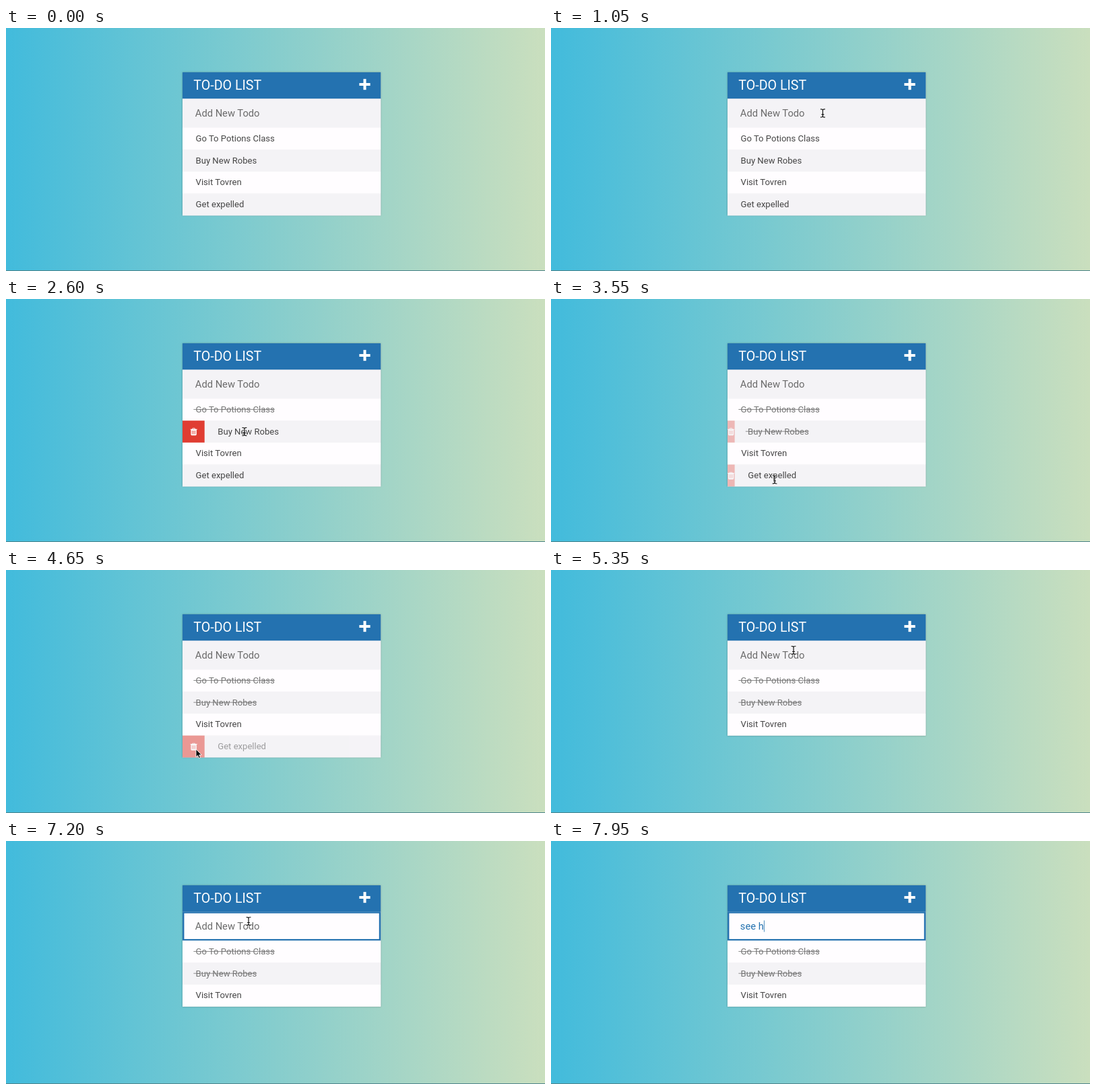
These frames come from a looping animation (800x362 px, 8 s). An HTML page:

```html
<!DOCTYPE html>
<html lang="en">
<head>
<meta charset="utf-8">
<title>To-do list</title>
<style>
  html, body { margin: 0; width: 100%; height: 100%; overflow: hidden; }
  body {
    position: relative;
    font: 16px Roboto, sans-serif;
    background: linear-gradient(to right, #42bbdc, #cadfbe);
  }
  .edge { position: absolute; left: 0; right: 0; top: 361px; height: 1px; background: #4f858c; }
  .card {
    position: absolute; left: 262px; top: 65.8px; width: 360px;
    transform: scale(.8172); transform-origin: 0 0;
    background: #f4f3f6; box-shadow: 0 0 3px rgba(0, 0, 0, .3);
  }
  h1 {
    position: relative; margin: 0; padding: 10px 20px;
    font-size: 24px; font-weight: 400; line-height: 28px;
    color: #fff; background: #2472b0;
  }
  h1 svg { position: absolute; left: 320.5px; top: 11.5px; }
  .field {
    box-sizing: border-box; height: 53px; padding: 13px 13px 13px 20px;
    border: 3px solid transparent; background: #f4f3f6;
    font-size: 18px; line-height: 21px; white-space: pre; color: #2472b0;
  }
  .field.focus { border-color: #2472b0; background: #fffdff; }
  .hint { color: #6b6b6b; }
  .caret {
    display: inline-block; width: 1.2px; height: 21px; margin-right: -1.2px;
    vertical-align: top; background: #2472b0;
  }
  ul { list-style: none; margin: 0; padding: 0; }
  li { position: relative; height: 40px; line-height: 40px; color: #454545; background: #fffdff; }
  li:nth-child(2n) { background: #f4f3f6; }
  li.done { color: #757575; }
  li.done .label { text-decoration: line-through; }
  .label { position: absolute; top: 0; white-space: pre; }
  .bin { position: absolute; left: 0; top: 0; height: 40px; background: #e03d32; }
  .bin svg { position: absolute; top: 12.5px; }
  .cursor { position: absolute; left: 0; top: 0; overflow: visible; }
</style>
</head>
<body>
<div class="edge"></div>
<div class="card">
  <h1>TO-DO LIST
    <svg width="20" height="20"><path d="M10 2.2V17.8M2.2 10H17.8" stroke="#fff" stroke-width="5" stroke-linecap="square"/></svg>
  </h1>
  <div class="field"><span class="typed"></span><span class="caret"></span><span class="hint">Add New Todo</span></div>
  <ul></ul>
</div>
<svg class="cursor" width="1" height="1">
  <g class="beam" fill="none" stroke-linecap="round">
    <path d="M-3 -6Q0 -6 0 -4.5Q0 -6 3 -6M0 -4.5V4.5M-3 6Q0 6 0 4.5Q0 6 3 6M-1.5 2H1.5" stroke="#fff" stroke-opacity=".6" stroke-width="2.4"/>
    <path d="M-3 -6Q0 -6 0 -4.5Q0 -6 3 -6M0 -4.5V4.5M-3 6Q0 6 0 4.5Q0 6 3 6M-1.5 2H1.5" stroke="#111" stroke-width="1.2"/>
  </g>
  <path class="arrow" d="M0 0V11.6L2.6 9.2L4.4 13.4L6.5 12.5L4.7 8.4H8.2Z" fill="#000" stroke="#fff" stroke-width=".9"/>
</svg>
<script>
const LOOP = 8000, SLIDE = 200, BLINK = 500;
const FOCUS = 5600, TYPE_FROM = 7480;

// hovers: [enter, leave] times of the pointer
const items = [
  { text: 'Go To Potions Class', done: 1900, hovers: [[1200, 2250], [5051, 5097]] },
  { text: 'Buy New Robes', done: 2850, hovers: [[2250, 3415], [5005, 5051]] },
  { text: 'Visit Tovren', hovers: [[3415, 3485], [4959, 5005]] },
  { text: 'Get expelled', fade: [4400, 4900], hovers: [[3485, 4930]] }
];

// pointer path: [time, x, y]
const path = [
  [950, 415, 112], [1350, 369, 171], [2150, 369, 171], [2400, 356, 197],
  [3370, 346, 200], [3415, 342, 213.9], [3485, 336, 246.6], [3550, 332, 269],
  [3750, 330, 267], [4100, 282, 267], [4930, 282, 267], [5130, 352, 125],
  [5300, 360, 119.5], [LOOP, 360, 119.5]
];
const arrowTimes = [4020, 4990];
const keys = [[7480, 's'], [7580, 'se'], [7680, 'see'], [7800, 'see '], [7900, 'see h']];

const $ = selector => document.querySelector(selector);
const clamp = v => Math.min(1, Math.max(0, v));
const within = (t, [from, to]) => t >= from && t < to;
const show = (el, on) => { el.style.display = on ? '' : 'none'; };

const trash = `<svg width="13" height="15"><path fill="#fff" fill-rule="evenodd"
  d="M0 2.2H3.4L4.2 .5H8.4L9.2 2.2H12.6V3.4H11.4V12.2Q11.4 14 9.8 14H2.8Q1.2 14 1.2 12.2V3.4H0Z
  M4.6 2.2H8L7.6 1.5H5Z M3.3 5V11.8H4.3V5Z M5.8 5V11.8H6.8V5Z M8.3 5V11.8H9.3V5Z"/></svg>`;

for (const item of items) {
  const li = document.createElement('li');
  li.innerHTML = `<span class="bin">${trash}</span><span class="label"> ${item.text}</span>`;
  $('ul').append(li);
  item.li = li;
  [item.bin, item.label] = li.children;
  item.icon = item.bin.firstChild;
}

const reveal = (t, hovers) => Math.max(...hovers.map(([enter, leave]) =>
  clamp(clamp((Math.min(t, leave) - enter) / SLIDE) - Math.max(0, t - leave) / SLIDE)));

function drawItem(item, t) {
  const open = reveal(t, item.hovers), width = 40 * open;
  item.bin.style.width = width + 'px';
  item.bin.style.opacity = open;
  item.icon.style.left = Math.max(0, (width - 12.6) / 2) + 'px';
  item.label.style.left = 20 + width + 'px';
  item.li.classList.toggle('done', t >= item.done);
  if (item.fade) {
    const [from, to] = item.fade;
    item.li.style.opacity = .5 + Math.cos(Math.PI * clamp((t - from) / (to - from))) / 2;
    show(item.li, t < to);
  }
}

function drawField(t) {
  const typed = keys.filter(([at]) => t >= at).map(([, text]) => text).pop() || '';
  const blinkOn = Math.floor((t - FOCUS) / BLINK) % 2 === 0;
  $('.field').classList.toggle('focus', t >= FOCUS);
  $('.typed').textContent = typed;
  show($('.hint'), !typed);
  show($('.caret'), t >= FOCUS && (typed || blinkOn));
}

function drawCursor(t) {
  const visible = within(t, [path[0][0], TYPE_FROM]);
  show($('.cursor'), visible);
  if (!visible) return;
  const next = path.findIndex(([at]) => at > t);
  const [t0, x0, y0] = path[next - 1], [t1, x1, y1] = path[next];
  const k = (t - t0) / (t1 - t0);
  $('.cursor').style.transform = `translate(${x0 + (x1 - x0) * k}px, ${y0 + (y1 - y0) * k}px)`;
  const arrow = within(t, arrowTimes);
  show($('.arrow'), arrow);
  show($('.beam'), !arrow);
}

const start = performance.now();
function frame() {
  const t = (performance.now() - start) % LOOP;
  items.forEach(item => drawItem(item, t));
  drawField(t);
  drawCursor(t);
  requestAnimationFrame(frame);
}
frame();
</script>
</body>
</html>
```
